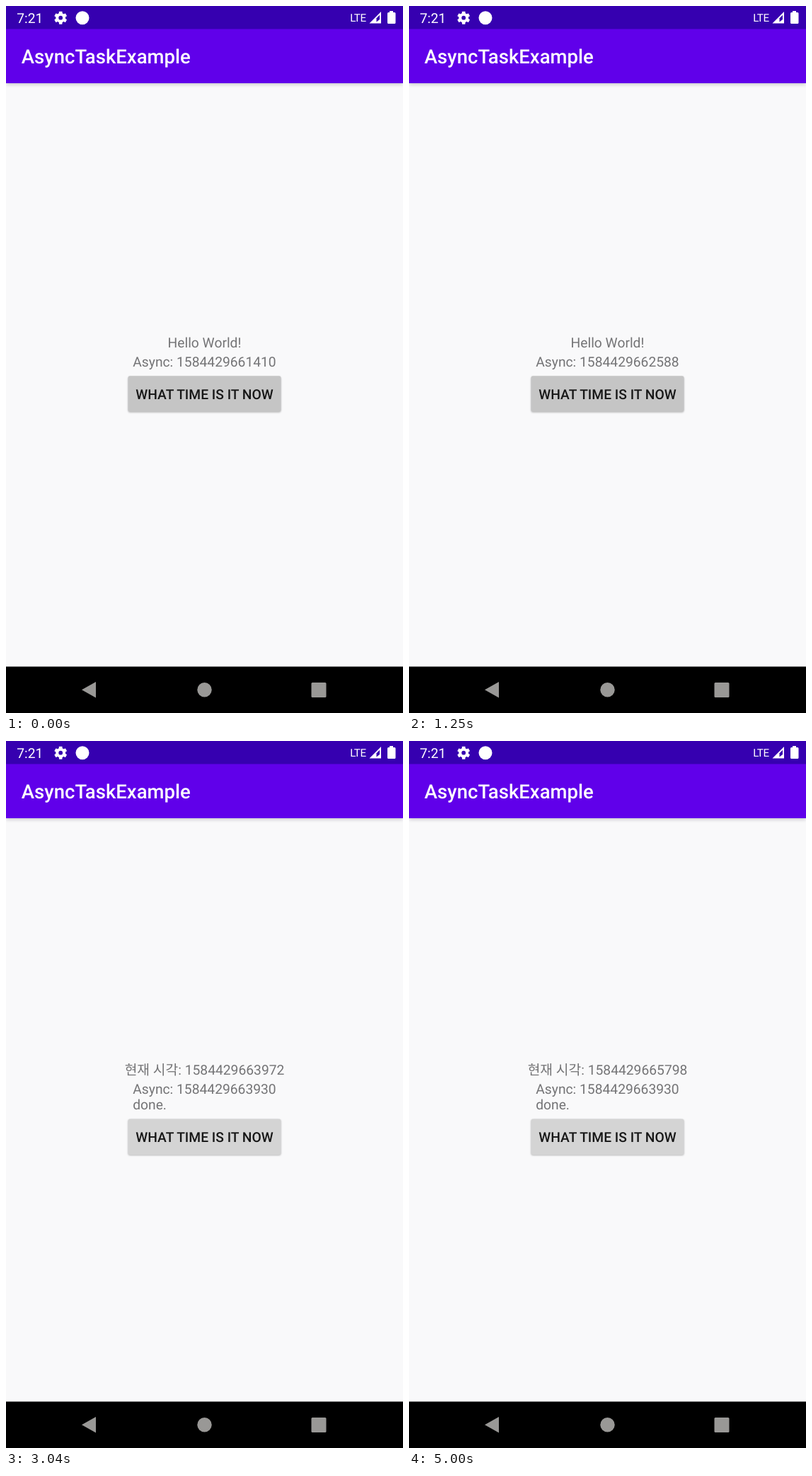
Write an HTML page that moves like this. It is 561 by 998 pixels and loops after 5.04 s.

```html
<!DOCTYPE html>
<html lang="ko">
<head>
<meta charset="utf-8">
<title>AsyncTaskExample</title>
<style>
  html, body { margin: 0; width: 100%; height: 100%; overflow: hidden; background: #f9f9fa; }
  svg { display: block; width: 100%; height: 100%; }
  text {
    font: 400 19.25px Roboto, "Noto Sans CJK KR", "Noto Sans CJK", sans-serif;
    text-rendering: geometricPrecision;
  }
  .medium { font-weight: 500; }
  .title { font-size: 27.5px; }
  .network { font-size: 15.2px; letter-spacing: -.5px; }
  .middle { text-anchor: middle; }
  .appbar { filter: drop-shadow(0 2px 2.5px rgba(0, 0, 0, .18)); }
</style>
</head>
<body>
<svg viewBox="0 0 561 998">
  <defs>
    <clipPath id="buttonShape"><rect x="172.5" y="522.2" width="216" height="50.6" rx="2.7"/></clipPath>
  </defs>
  <rect width="561" height="998" fill="#f9f9fa"/>

  <rect class="appbar" y="32" width="561" height="77" fill="#6000ea"/>
  <rect width="561" height="32.5" fill="#3600b0"/>
  <g fill="#fff">
    <text class="medium title" x="21.8" y="81.4">AsyncTaskExample</text>
    <text x="15.2" y="23.8">7:21</text>
    <!-- settings gear -->
    <g transform="translate(77.2 16.7)">
      <g id="teeth"></g>
      <circle r="4.9" fill="none" stroke="#fff" stroke-width="4"/>
    </g>
    <circle cx="108" cy="16.7" r="9.5"/>
    <text class="network" x="486.2" y="22">LTE</text>
    <!-- signal -->
    <path d="M513.5 24.5 530 8V24.5Z"/>
    <path d="M523.5 17.2 528 12.7V19L523.5 22.5Z" fill="#3600b0"/>
    <!-- battery -->
    <path d="M542 7h5v2h2q1.5 0 1.5 1.5v13q0 1.5-1.5 1.5h-8.5q-1.5 0-1.5-1.5v-13q0-1.5 1.5-1.5h1.5z"/>
  </g>

  <g id="labels" fill="#747476">
    <text id="clock" class="middle" x="280.5" y="482.2"></text>
    <text id="progress" class="middle" x="280.5" y="508.9"></text>
    <text id="done" x="179.2" y="531.4">done.</text>
  </g>
  <g id="button">
    <rect id="face" x="172.5" y="522.2" width="216" height="50.6" rx="2.7" fill="#d4d4d4"/>
    <g clip-path="url(#buttonShape)">
      <rect id="focus" x="172" y="522" width="217" height="51" fill-opacity=".07"/>
      <g id="ripples"></g>
    </g>
    <text class="medium middle" x="280.5" y="554.6" fill="#161616">WHAT TIME IS IT NOW</text>
  </g>

  <rect y="932.5" width="561" height="65.5"/>
  <g fill="#999896">
    <path d="M107 965.3 127 954V976.6Z"/>
    <circle cx="280.5" cy="965.3" r="10.2"/>
    <rect x="431.5" y="955" width="21" height="21" rx="1.5"/>
  </g>
</svg>
<script>
const $ = id => document.getElementById(id);
const add = (parent, tag, attrs) => {
  const node = document.createElementNS('http://www.w3.org/2000/svg', tag);
  for (const name in attrs) node.setAttribute(name, attrs[name]);
  return parent.appendChild(node);
};
const clamp = x => Math.max(0, Math.min(1, x));

const LOOP = 5040, FRAME = 1000 / 24;
const EPOCH = 1584429660000;
const CLOCK_OFFSET = 1440;   // wall clock, in ms after EPOCH, when the loop starts
const PRESS = 80;            // time from touch down to release
const DONE = 2583;
const clicks = [3448, 3972, 4680, 5030, 5358, 5798].map(stamp => ({
  stamp,
  down: stamp - CLOCK_OFFSET - PRESS,
  ripple: add($('ripples'), 'circle', { cx: 312, cy: 547.5 })
}));
// [loop time, async timestamp after EPOCH]
const progressKeys = [[0, 1410], [458.3, 1685], [1250, 2588], [2041.7, 3369], [DONE, 3930]];

for (let a = 0; a < 360; a += 60)
  add($('teeth'), 'rect', { x: -2.3, y: -9, width: 4.6, height: 4, rx: .6, transform: `rotate(${a})` });

function progressAt(t) {
  const i = progressKeys.findIndex(key => t < key[0]);
  if (i < 0) return 3930;
  const [t0, v0] = progressKeys[i - 1], [t1, v1] = progressKeys[i];
  return Math.round(v0 + (v1 - v0) * (t - t0) / (t1 - t0));
}

function setText(id, text) {
  if ($(id).textContent !== text) $(id).textContent = text;
}

function render(time) {
  const t = Math.floor((time % LOOP + 5) / FRAME) * FRAME;
  const finished = t >= DONE - 1;
  const shift = finished ? 11.2 : 0;
  $('labels').setAttribute('transform', `translate(0 ${-shift})`);
  $('button').setAttribute('transform', `translate(0 ${shift})`);
  $('done').setAttribute('visibility', finished ? 'visible' : 'hidden');
  $('focus').setAttribute('visibility', t < clicks[0].down ? 'visible' : 'hidden');

  let label = 'Hello World!', lift = 0;
  for (const { stamp, down, ripple } of clicks) {
    const age = t - down;
    if (age >= PRESS) label = '현재 시각: ' + (EPOCH + stamp);
    const grow = 1 - (1 - clamp(age / 225)) ** 2;
    const alpha = clamp(age / 75) * clamp((375 - age) / 150);
    ripple.setAttribute('r', 153 * grow);
    ripple.setAttribute('fill-opacity', .12 * alpha);
    lift = Math.max(lift, Math.min(clamp(age / 100), clamp((PRESS + 140 - age) / 100)));
  }
  setText('clock', label);
  setText('progress', 'Async: ' + (EPOCH + progressAt(t)));
  $('face').style.filter =
    `drop-shadow(0 ${1.3 + 1.7 * lift}px ${1.3 + 1.7 * lift}px rgba(0,0,0,.26))`;
}

function tick() {
  render(performance.now());
  requestAnimationFrame(tick);
}
tick();
</script>
</body>
</html>
```
